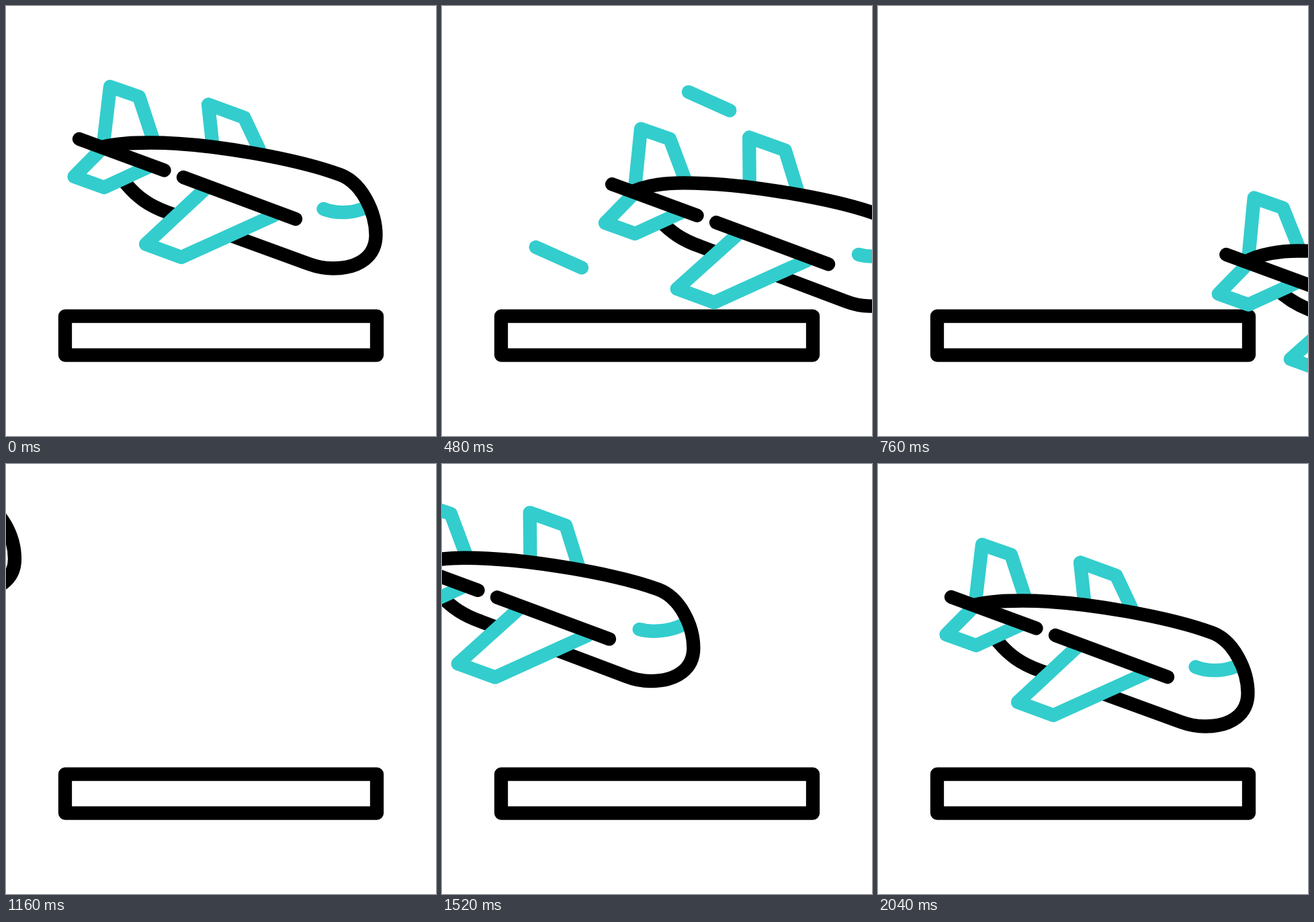
An HTML page for the animation above (2.12 s loop, 640 px wide and 640 px high).

```html
<!DOCTYPE html>
<html lang="en">
<head>
<meta charset="utf-8">
<title>Plane landing</title>
<style>
  html, body { margin: 0; height: 100%; overflow: hidden; background: #fff; }
  svg { display: block; width: 100%; height: 100%; }
  path { fill: none; stroke: #000; stroke-width: 20.3; stroke-linecap: round; stroke-linejoin: round; }
  .teal { stroke: #33cdcd; }
  .solid { fill: #fff; }
  .fill { fill: #fff; stroke: none; }
</style>
</head>
<body>
<svg viewBox="0 0 640 640">
  <path d="M88 461.6H552V519.6H88Z"/>
  <path class="teal" id="dashA"/>
  <path class="teal" id="dashB"/>
  <!-- Points are x,y with an optional :dx,dy reached when the plane is fully banked -->
  <g id="plane">
    <path class="teal solid" data-d="M145,205:-3,-2 L155,120:-4.5,-6.5 L198,135:-4.5,-6.5 L221,205:-1,-10"/>
    <path class="teal solid" data-d="M307.6,208:9,-12 L301,146.5:18,-27 L354.5,166:18,-27.5 L377.5,215:11,-12"/>
    <path class="fill" id="hull"/>
    <path class="teal" data-d="M472.5,302:5,1 C490,309:3,-2.5 514,309:6,-4 533,301:10,-7"/>
    <path id="outline" data-d="M143,210:-4,-2 C165,204:-5,-7 190,203.5:0,-11 215,203.5:0,-11
      C310,203.5:0,-11 440,230:8,-13 497,251:10,-12 C530,263:10,-12 550.5,308:9,-16 550.5,341:9,-16
      C550.5,372:9,-16 526,390.5:8,-16.5 487,390.5:8,-16.5 C475,390.5:8,-16.5 462,388:8,-17 451,384:8,-17.5
      L240,307:0,-24.5 C212,297:3,-23 195,284:3,-21 179,265:3,-18 L165,248:3,-16"/>
    <path class="teal solid" data-d="M140,215:-2,0 L101.5,254:-4,2.5 L146,270:-4,2.5 L211,240:0,1"/>
    <path class="teal solid" data-d="M296,272.5 L208,354.5:-3.5,-1 L261,374 L399,311.5"/>
    <path d="M109 198L235.5 244.5M264 255L431 317"/>
  </g>
</svg>
<script>
  const LOOP = 2120, STEP = 40;
  const byId = id => document.getElementById(id);
  const plane = byId('plane'), hull = byId('hull'), outline = byId('outline');
  const parts = [...plane.querySelectorAll('[data-d]')];
  const point = /([\d.]+),([\d.]+)(?::(-?[\d.]+),(-?[\d.]+))?/g;

  const bend = (d, m) => d.replace(point, (_, x, y, dx = 0, dy = 0) =>
    `${+x + dx * m},${+y + dy * m}`);

  // Offset and bank amount for a step of the loop
  function flight(n) {
    if (n < 26) {
      const k = Math.max(0, n - 1);
      const x = k <= 18 ? 0.893 * k ** 2.12 : 409 + 45.5 * (k - 18);
      return { x, y: x * (0.4915 - 0.000174 * x), m: Math.min(1, (k / 14) ** 1.64) };
    }
    const k = Math.max(0, 51 - n);
    const x = -0.855 * k ** 2.09;
    return { x, y: x * (0.2985 - 0.0000683 * x), m: Math.min(1, (k / 16.5) ** 1.8) };
  }

  function ease(n, start) {
    const u = Math.min(1, Math.max(0, (n - start) / 9));
    return u * u * (3 - 2 * u);
  }

  // A wind streak: its head leaves first and its tail catches up
  function streak(id, x, y, n, start) {
    const tail = 175.5 * ease(n, start + 2.42), head = 175.5 * ease(n, start);
    const at = s => `${x + s} ${y + s * 0.447}`;
    byId(id).setAttribute('d', head - tail > 0.3 ? `M${at(tail)}L${at(head)}` : '');
  }

  function draw(now) {
    const n = Math.floor(now % LOOP / STEP);
    const { x, y, m } = flight(n);
    plane.setAttribute('transform', `translate(${x.toFixed(2)} ${y.toFixed(2)})`);
    for (const p of parts) p.setAttribute('d', bend(p.dataset.d, m));
    hull.setAttribute('d', outline.getAttribute('d'));
    streak('dashA', 271, 85.2, n, 4.8);
    streak('dashB', 98.5, 340.6, n, 6.75);
  }

  let begin;
  function tick(now) {
    begin ??= now;
    draw(Math.max(0, now - begin));
    requestAnimationFrame(tick);
  }
  draw(0);
  requestAnimationFrame(tick);
</script>
</body>
</html>
```
